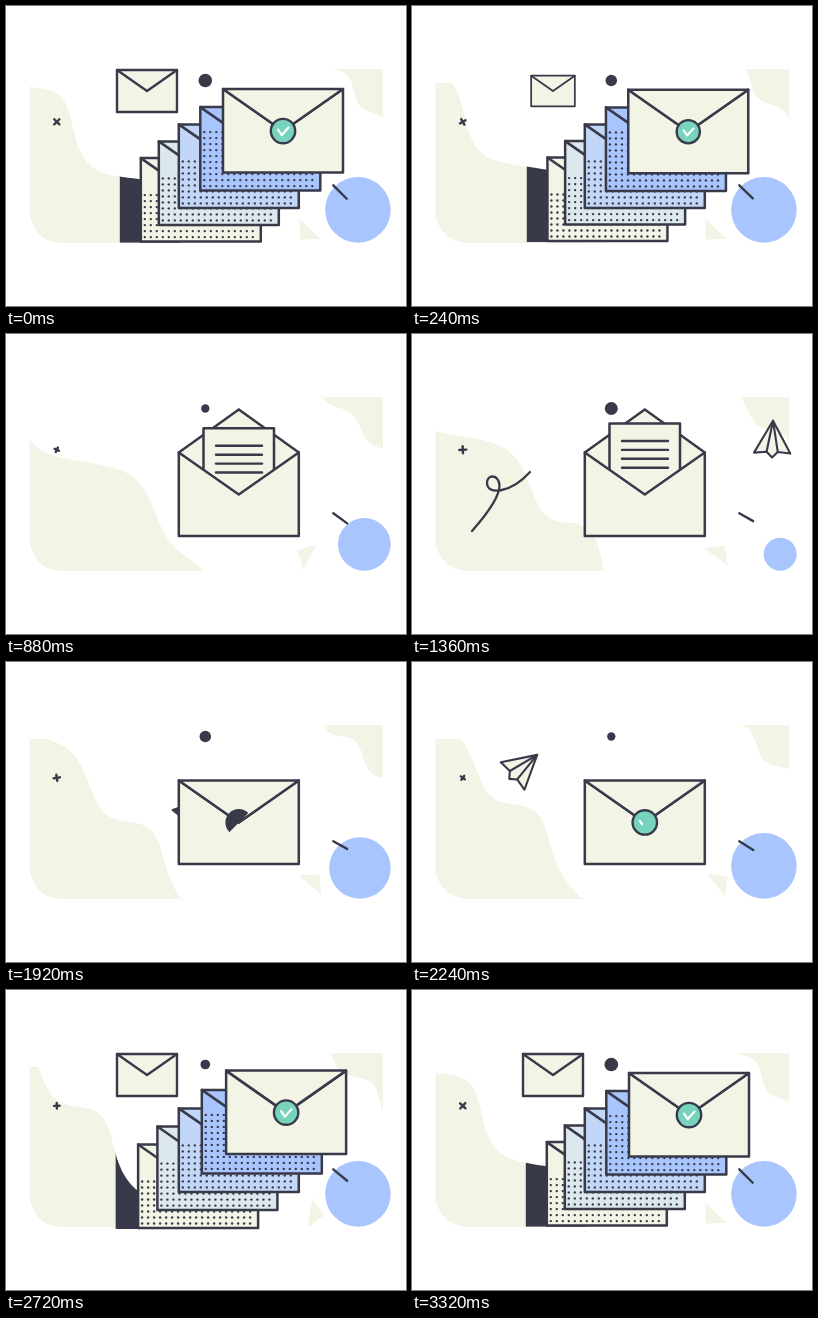
Write an HTML page with a canvas that moves like this. It is 400 px wide and 300 px high and loops after 3.36 s.

```html
<!DOCTYPE html>
<html lang="en">
<head>
<meta charset="utf-8">
<title>Envelopes</title>
<style>
html, body { margin: 0; width: 100%; height: 100%; overflow: hidden; background: #fff; }
canvas { display: block; width: 400px; height: 300px; }
</style>
</head>
<body>
<canvas id="stage"></canvas>
<script>
const LOOP = 3360, TAU = 2 * Math.PI;
const INK = '#383a49', IVORY = '#f2f4e5', BLUE = '#a9c5fe', TEAL = '#78d3bd';
const canvas = document.getElementById('stage');
const c = canvas.getContext('2d');
const dpr = window.devicePixelRatio || 1;
canvas.width = 400 * dpr;
canvas.height = 300 * dpr;

const rad = a => a * Math.PI / 180;
const mix = (a, b, k) => a + (b - a) * k;
const polar = (x, y, r, a) => [x + r * Math.cos(rad(a)), y + r * Math.sin(rad(a))];
const part = (t, a, b) => Math.min(1, Math.max(0, (t - a) / (b - a)));
const ease = (t, a, b) => { const k = part(t, a, b); return k * k * (3 - 2 * k); };
const backIn = k => k * k * (2.4 * k - 1.4);
const backOut = k => 1 - backIn(1 - k);

// Point u of a smooth curve through pts, one unit per point.
function spline(pts, u) {
  const i = Math.min(pts.length - 2, Math.max(0, Math.floor(u))), k = u - i;
  const b = pts[i], d = pts[i + 1], a = pts[i - 1] || b, e = pts[i + 2] || d;
  return b.map((v, j) => {
    const m = (d[j] - a[j]) / 2, n = (e[j] - v) / 2, q = d[j] - v;
    return v + k * (m + k * (3 * q - 2 * m - n + k * (m + n - 2 * q)));
  });
}

// Stepped edges that drift by one whole shift per loop.
const leftWave = { steps: [[86, 161], [180, 189], [218, 254], [266, 273]], shift: [210, 181], bend: 180 };
const rightWave = { steps: [[341, 69], [354, 100], [381, 114], [399, 143], [426, 153], [441, 184]], shift: [133, 128], bend: 900 };

const flight = [[240, 170], [315, 160], [361, 87], [320, 30], [270, 150], [95, 130], [125, 93], [165, 69]];
const dive = [[125, 95], [162, 120], [235, 181]];

function poly(pts, fill, stroke, open) {
  c.beginPath();
  pts.forEach(p => c.lineTo(p[0], p[1]));
  if (!open) c.closePath();
  if (fill) { c.fillStyle = fill; c.fill(); }
  if (stroke) { c.strokeStyle = INK; c.lineWidth = stroke; c.stroke(); }
}

function disc(x, y, r, fill) {
  c.beginPath();
  c.arc(x, y, r, 0, 7);
  c.fillStyle = fill;
  c.fill();
}

function wavePath({ steps, shift, bend }, t, corner) {
  const pts = [];
  for (let n = -1; n < 3; n++)
    for (const [sx, sy] of steps) {
      const x = sx + (n - t / LOOP) * shift[0], y = sy + (n - t / LOOP) * shift[1];
      pts.push([x, y + .9 * Math.max(0, x - bend)]);
    }
  c.beginPath();
  for (let u = 0; u < pts.length - 1; u += .05) c.lineTo(...spline(pts, u));
  c.lineTo(...corner);
  c.closePath();
}
const leftPath = t => wavePath(leftWave, t, [-600, 900]);

function blobs(t) {
  c.fillStyle = IVORY;
  c.save();
  c.beginPath();
  c.roundRect(23.5, 77, 340, 160, [0, 0, 0, 32]);
  c.clip();
  leftPath(t);
  c.fill();
  c.restore();
  c.save();
  c.beginPath();
  c.rect(280, 63, 97, 80);
  c.clip();
  wavePath(rightWave, t, [800, -300]);
  c.fill();
  c.restore();
}

function extras(t) {
  const turn = TAU * t / LOOP, wave = Math.cos(turn);
  const pulse = Math.cos(2 * turn + .44);

  const r = 32.8 - 16.3 * (ease(t, 520, 1360) - ease(t, 1360, 2080));
  disc(384.7 - r, 236.7 - r, r, BLUE);

  const w = 134 + 172 * ease(t, 480, 1360) + 188 * part(t, 1360, LOOP - 40) ** 3;
  poly([-90, 0, 90].map(d => polar(304, 223, 14.5, w + d)), IVORY);

  poly([[327.3, 179.3], polar(327.3, 179.3, 17.3 + 1.7 * wave, 36.5 + 8.5 * wave)], null, 2.4, true);
  disc(199.3, 74.5, 5.4 + 1.5 * pulse, INK);

  const a = 45 + 360 * t / LOOP - 24 * Math.sin(turn), s = 3 + .7 * pulse;
  for (const q of [a, a + 90])
    poly([polar(50.8, 115.8, s, q), polar(50.8, 115.8, s, q + 180)], null, 2.4, true);
}

// Shows only the stretch of the next line between two lengths.
function dash(from, to) {
  c.setLineDash([to - from, 400]);
  c.lineDashOffset = -from;
}

function trail(t) {
  const from = 135 * ease(t, 1400, 1660), to = 135 * ease(t, 1000, 1320);
  if (to - from < 1) return;
  c.save();
  dash(from, to);
  c.beginPath();
  c.moveTo(60, 197);
  c.bezierCurveTo(75, 180, 88, 162, 87.5, 151);
  c.bezierCurveTo(86, 140, 75, 140, 75, 149);
  c.bezierCurveTo(75, 161, 98, 160, 118, 138);
  c.strokeStyle = INK;
  c.lineWidth = 2.3;
  c.stroke();
  c.restore();
}

function plane(path, u, s) {
  if (s <= .02) return;
  const [x, y] = path(u), [p, q] = path(u - .01), [v, w] = path(u + .01);
  const lw = 2.1 / Math.max(s, .3);
  c.save();
  c.translate(x, y);
  c.rotate(Math.atan2(w - q, v - p));
  c.scale(s, s);
  poly([[0, 0], [-40.5, -22.7], [-39, -7], [-46, 0], [-39, 7], [-40.5, 22.7]], IVORY, lw);
  poly([[-39, -7], [0, 0], [-39, 7]], null, lw, true);
  c.restore();
}

function planes(t) {
  const [a, b, d] = dive;
  const quad = k => a.map((v, j) => mix(mix(v, b[j], k), mix(b[j], d[j], k), k));
  if (t < 680) plane(quad, part(t, 280, 680), ease(t, 260, 400));
  if (t > 920) plane(u => spline(flight, u), (t - 920) / 220, .8 * (1 - ease(t, 2280, 2400)));
}

function smallEnvelope(t) {
  const s = t < 1000 ? 1 - backIn(part(t, 40, 300)) : backOut(part(t, 2320, 2660));
  if (s <= .02) return;
  c.save();
  c.translate(141, 85);
  c.scale(s, s);
  poly([[-30, -21], [30, -21], [30, 21], [-30, 21]], IVORY, 2.4);
  poly([[-30, -21], [0, 0], [30, -21]], null, 2.4, true);
  c.restore();
}

const W = 120, H = 83.5;

function dottedEnvelope(x, y, fill, top) {
  poly([[x, y], [x + W, y], [x + W, y + H], [x, y + H]], fill, 2.5);
  poly([[x, y], [x + W / 2, y + H / 2], [x + W, y]], null, 2.5, true);
  for (let v = 79; v >= top; v -= 6)
    for (let u = 4; u < W - 2; u += 6) disc(x + u, y + v, 1.2, INK);
}

function mainEnvelope(x, y, t) {
  const open = ease(t, 400, 640) - ease(t, 1620, 1800);
  const tip = y + mix(42, -43, open), up = tip < y;
  const L = [x, y], R = [x + W, y], V = [x + W / 2, y + 42], T = [x + W / 2, tip];
  poly([L, R, V], IVORY);
  if (up) poly([L, T, R], IVORY, 2.5, true);

  if (open > 0) {
    const top = mix(146, 89.5, ease(t, 520, 960) - ease(t, 1400, 1640));
    poly([[197.5, top], [268, top], [268, 200], [197.5, 200]], IVORY, 2.5);
    for (let d = 17.5; d < 45; d += 8.9)
      if (top + d < 198) poly([[210, top + d], [256, top + d]], null, 2.4, true);
  }
  poly([L, V, R, [x + W, y + H], [x, y + H]], IVORY, 2.5);
  if (!up) poly([L, T, R], IVORY, 2.5);
}

// A disc uncovered by a diagonal that sweeps across it.
function sweptDisc(k, r, fill) {
  c.save();
  c.rotate(rad(45));
  c.beginPath();
  c.rect(-14, -14, 28 * k, 28);
  c.clip();
  disc(0, 0, r, fill);
  c.restore();
}

function seal(x, y, t) {
  const first = t < 1000;
  const s = first ? 1 - ease(t, 220, 380) : 1;
  const grown = (a, b) => first ? 1 : part(t, a, b);
  if (s <= 0) return;
  c.save();
  c.translate(x, y);
  c.scale(s, s);
  sweptDisc(grown(1840, 2000), 13.4, INK);
  sweptDisc(grown(1980, 2140), 11, TEAL);
  const k = grown(2180, 2440);
  if (k > 0) {
    dash(0, 17 * k);
    c.beginPath();
    c.moveTo(-5, -1.5);
    c.lineTo(-1.2, 4);
    c.lineTo(5.5, -3.5);
    c.strokeStyle = '#fff';
    c.lineWidth = 2.2;
    c.stroke();
  }
  c.restore();
}

function stack(t) {
  const s = t < 1000 ? 1 - backIn(part(t, 0, 400)) : backOut(part(t, 2300, 2980));
  const X = 172.8, Y = 118.4;
  if (s > .001) {
    c.save();
    leftPath(t);
    c.clip();
    c.fillStyle = INK;
    c.fillRect(X - 59 * s, Y + 33.7 * s - 1, 60, H + 2);
    c.restore();
    dottedEnvelope(X - 38 * s, Y + 33.7 * s, IVORY, 35);
    dottedEnvelope(X - 20 * s, Y + 17 * s, '#dce7ee', 34);
    dottedEnvelope(X, Y, '#c2d7f8', 33);
    dottedEnvelope(X + 21.5 * s, Y - 17.3 * s, BLUE, 20);
  }
  const x = X + 44.2 * s, y = Y - 35.3 * s;
  mainEnvelope(x, y, t);
  seal(x + W / 2, y + 42, t);
}

function draw(t) {
  c.setTransform(dpr, 0, 0, dpr, 0, 0);
  c.fillStyle = '#fff';
  c.fillRect(0, 0, 400, 300);
  c.lineJoin = c.lineCap = 'round';
  blobs(t);
  extras(t);
  trail(t);
  planes(t);
  smallEnvelope(t);
  stack(t);
}

const start = performance.now();
function tick() {
  draw((performance.now() - start) % LOOP);
  requestAnimationFrame(tick);
}
tick();
</script>
</body>
</html>
```
